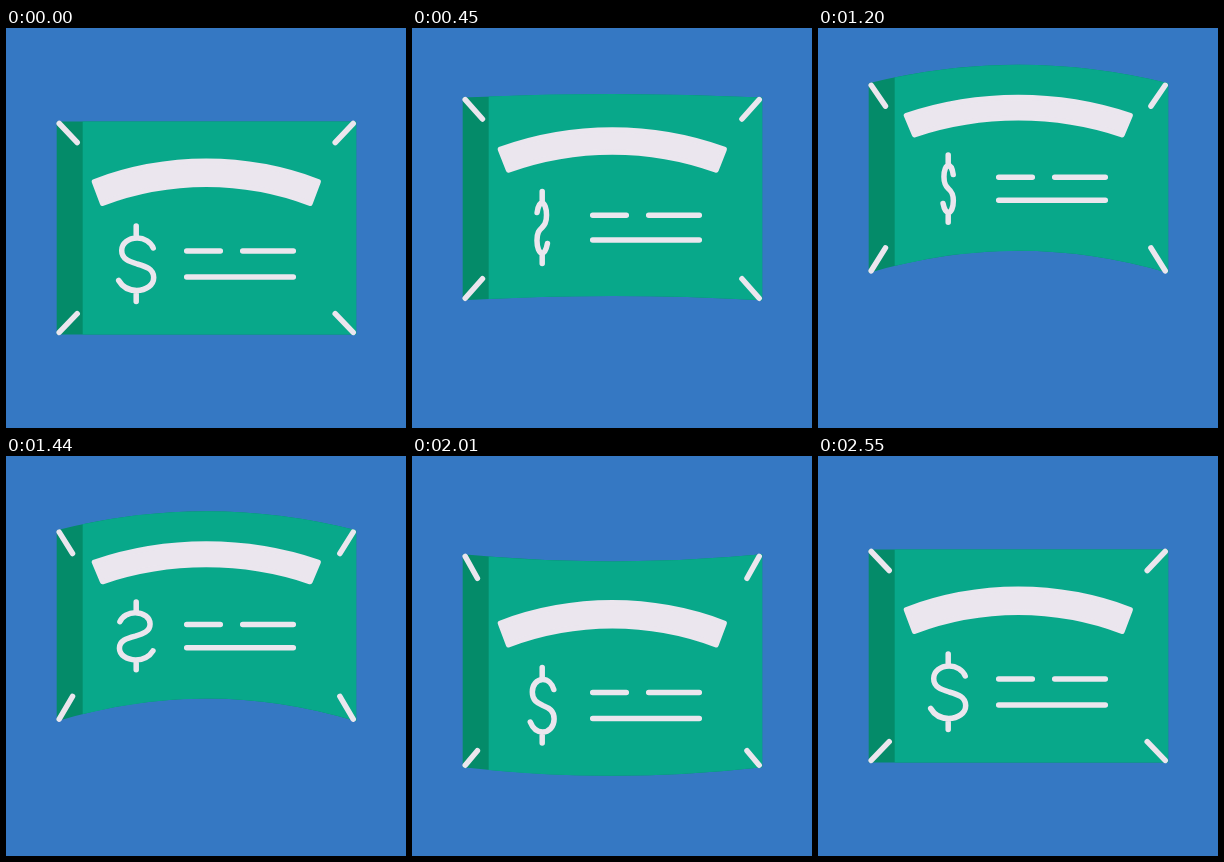
Write an HTML page that moves like this. It is 400 px wide and 400 px high and loops after 4.58 s.

```html
<!DOCTYPE html>
<html lang="en">
<head>
<meta charset="utf-8">
<title>Waving banknote</title>
<style>
html, body { margin: 0; height: 100%; overflow: hidden; background: #3578c3; }
svg { display: block; width: 100vw; height: 100vh; }
.line { fill: none; stroke: #ebe6ee; stroke-width: 5.5; stroke-linecap: round; stroke-linejoin: round; }
.line path { vector-effect: non-scaling-stroke; }
</style>
</head>
<body>
<svg viewBox="0 0 400 400">
  <clipPath id="right"><rect x="76.7" width="324" height="400"/></clipPath>
  <path class="sheet" fill="#048b69"/>
  <path class="sheet" fill="#08a88a" clip-path="url(#right)"/>
  <g id="content" class="line">
    <path fill="#ebe6ee" d="M88.5 153.7A317.5 317.5 0 0 1 312.1 153.7L304 175.2A294.5 294.5 0 0 0 96.6 175.2Z"/>
    <path d="M180.7 223H214.3M236.7 223H287.3M180.7 249H287.3"/>
    <g id="dollar">
      <path d="M0 198V210M0 262.5V273.5M17 220C14.5 214 8 210 1 210C-8 210 -14.5 215.5 -14.5 222.5C-14.5 231 -7 233.5 1 236C10 238.5 17.5 241 17.5 249.5C17.5 257 10 262.5 .5 262.5C-8 262.5 -14 258.5 -17.5 252.5"/>
    </g>
  </g>
  <path id="marks" class="line"/>
</svg>
<script>
const LOOP = 4580, END = 2550, STEP = 30;
const TOP = 93.5, LOW = 306.5, ARC = 131;

// Each key: time, value, then the optional x handles of the ease leading to it.
const edge = [[0, 0], [1130, -63, .33, .34], [1950, 5], [END, 0]];
const lift = [[0, 0], [1170, -64, .33, .38], [2010, 13.5], [END, 0]];
const bend = [[100, 0], [1380, -19.5], [2130, 9], [END, 0]];
const squash = [[0, 1], [1250, .89, .33, .38], [2010, 1, .6, .7]];
const tuck = [[0, 0], [2010, 5.8], [END, 0]];
const spin = [[0, 0], [END, 4 * Math.PI, .22, .52]];

const $ = id => document.getElementById(id);
const sheets = document.querySelectorAll('.sheet');

// cubic-bezier(a, 0, b, 1), solved by bisection
function ease(x, a = 1 / 3, b = 2 / 3) {
  let lo = 0, hi = 1, u = .5;
  for (let i = 0; i < 24; i++) {
    u = (lo + hi) / 2;
    const v = 1 - u;
    if (3 * v * v * u * a + 3 * v * u * u * b + u ** 3 < x) lo = u;
    else hi = u;
  }
  return u * u * (3 - 2 * u);
}

function at(keys, t) {
  if (t <= keys[0][0]) return keys[0][1];
  const i = keys.findIndex(k => t <= k[0]);
  if (i < 0) return keys[keys.length - 1][1];
  const [t0, v0] = keys[i - 1];
  const [t1, v1, a, b] = keys[i];
  return v0 + (v1 - v0) * ease((t - t0) / (t1 - t0), a, b);
}

function draw(t) {
  const scale = at(squash, t), curve = at(bend, t), pull = at(tuck, t);
  const low = LOW + at(edge, t);
  const top = low - (LOW - TOP) * scale;

  const outline = `M50.7 ${top}Q200.5 ${top + 2 * curve} 350.2 ${top}` +
    `V${low}Q200.5 ${low + 2.4 * curve} 50.7 ${low}Z`;
  sheets.forEach(s => s.setAttribute('d', outline));

  $('content').setAttribute('transform',
    `translate(0 ${ARC + at(lift, t) - ARC * scale}) scale(1 ${scale})`);
  $('dollar').setAttribute('transform',
    `translate(130.2 0) scale(${Math.cos(at(spin, t)) || .001} 1)`);

  let marks = '';
  for (const side of [-1, 1]) {
    const x = 200.2 + 147 * side, dx = side * (pull - 18);
    marks += `M${x} ${top + 2}l${dx} ${19 + pull / 2}` +
      `M${x} ${low - 2.1}l${dx} ${.3 * curve + .35 * pull - 18.7}`;
  }
  $('marks').setAttribute('d', marks);
}

const start = performance.now();
function tick() {
  const t = (performance.now() - start) % LOOP;
  draw(Math.min(END, Math.floor(t / STEP) * STEP));
  requestAnimationFrame(tick);
}
tick();
</script>
</body>
</html>
```
